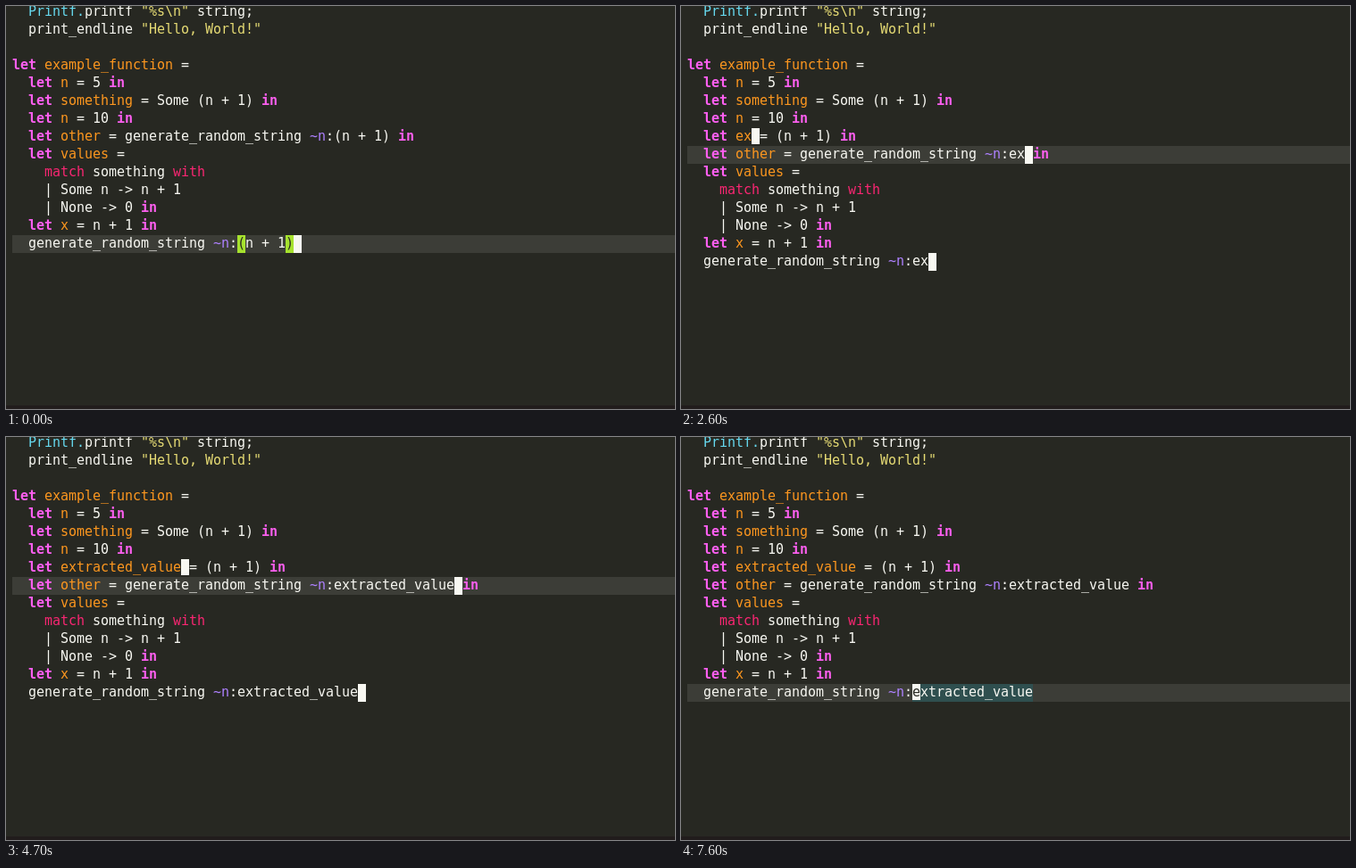
Animation, 749 px wide and 452 px high, one loop 8000 ms. Source, as an HTML page with a canvas:

```html
<!DOCTYPE html>
<html lang="en">
<head>
<meta charset="utf-8">
<title>Extract expression</title>
<style>
html, body { margin: 0; width: 100%; height: 100%; overflow: hidden; background: #272822; }
canvas { display: block; }
</style>
</head>
<body>
<canvas id="stage" width="749" height="452"></canvas>
<script>
const ctx = document.getElementById('stage').getContext('2d');
const LOOP = 8000, LEFT = 7, TOP = -3, CELL = 9, ROW = 20, FONT = '15px "DejaVu Sans Mono", monospace';
const BACK = '#272822', FORE = '#f8f8f2', LINE = '#3c3d37', GREEN = '#a6e22e', REGION = '#2f4f4f';

const NAME = 'extracted_value';
// [time, letters typed so far]
const TYPING = [[2400, 1], [2600, 2], [2900, 3], [3000, 4], [3200, 5], [3300, 6], [3600, 7],
  [3800, 8], [4000, 9], [4200, 10], [4400, 12], [4600, 14], [4700, 15]];
// spans of time when the blinking cursor is hidden
const HIDDEN = [[1000, 1500], [2200, 2400], [6700, 7200]];

const RULES = [
  [/"[^"]*"/g, '#e6db74'],
  [/\b(let|in)\b/g, '#fd5ff0', 'bold '],
  [/\b(match|with)\b/g, '#f92672'],
  [/(?<=let )\w+/g, '#fd971f'],
  [/~\w+/g, '#ae81ff'],
  [/Printf\./g, '#66d9ef']
];

function code(extracted, name) {
  const arg = extracted ? name : '(n + 1)';
  return [
    '  Printf.printf "%s\\n" string;',
    '  print_endline "Hello, World!"',
    '',
    'let example_function =',
    '  let n = 5 in',
    '  let something = Some (n + 1) in',
    '  let n = 10 in',
    ...(extracted ? [`  let ${name} = (n + 1) in`] : []),
    `  let other = generate_random_string ~n:${arg} in`,
    '  let values =',
    '    match something with',
    '    | Some n -> n + 1',
    '    | None -> 0 in',
    '  let x = n + 1 in',
    `  generate_random_string ~n:${arg}`
  ];
}

function box(row, col, count, color, height = ROW) {
  ctx.fillStyle = color;
  ctx.fillRect(LEFT + col * CELL, TOP + row * ROW, count * CELL, height);
}

function drawLine(text, row, dark) {
  const styles = Array.from(text, () => [FORE, '']);
  for (const [pattern, color, weight = ''] of RULES)
    for (const m of text.matchAll(pattern))
      styles.fill([color, weight], m.index, m.index + m[0].length);
  styles.forEach(([color, weight], col) => {
    if (text[col] === ' ') return;
    ctx.font = weight + FONT;
    ctx.fillStyle = dark.has(row + ',' + col) ? BACK : color;
    ctx.fillText(text[col], LEFT + col * CELL, TOP + row * ROW + 14);
  });
}

function draw(t) {
  const extracted = t >= 1700, editing = extracted && t < 5200;
  const typed = TYPING.reduce((n, [at, count]) => t >= at ? count : n, 0);
  const shown = !HIDDEN.some(([from, to]) => t >= from && t < to);
  const last = extracted ? 14 : 13;
  const dark = new Set();
  const mark = (row, col, color, height) => {
    box(row, col, 1, color, height);
    dark.add(row + ',' + col);
  };

  ctx.fillStyle = BACK;
  ctx.fillRect(0, 0, 749, 452);
  box(editing ? 8 : t >= 5200 && t < 6200 ? 7 : last, 0, 83, LINE);

  if (!extracted) {
    if (t >= 500) box(last, 28, 7, REGION);
    mark(last, 28, GREEN);
    mark(last, 34, GREEN);
  }
  if (editing) {
    mark(8, 40 + typed, FORE);
    mark(14, 28 + typed, FORE);
  }
  if (t >= 7600) box(last, 28, NAME.length, REGION);

  if (shown) {
    if (t < 500) mark(last, 35, FORE);
    else if (!extracted || t >= 6200) mark(last, 28, FORE, 18);
    else mark(7, t < 5800 ? 6 + typed : 6, FORE, 18);
  }

  code(extracted, NAME.slice(0, typed)).forEach((text, row) => drawLine(text, row, dark));

  ctx.fillStyle = '#211c1c';
  ctx.fillRect(0, 448, 749, 4);
}

const start = performance.now();
function tick() {
  draw((performance.now() - start) % LOOP);
  requestAnimationFrame(tick);
}
tick();
</script>
</body>
</html>
```
